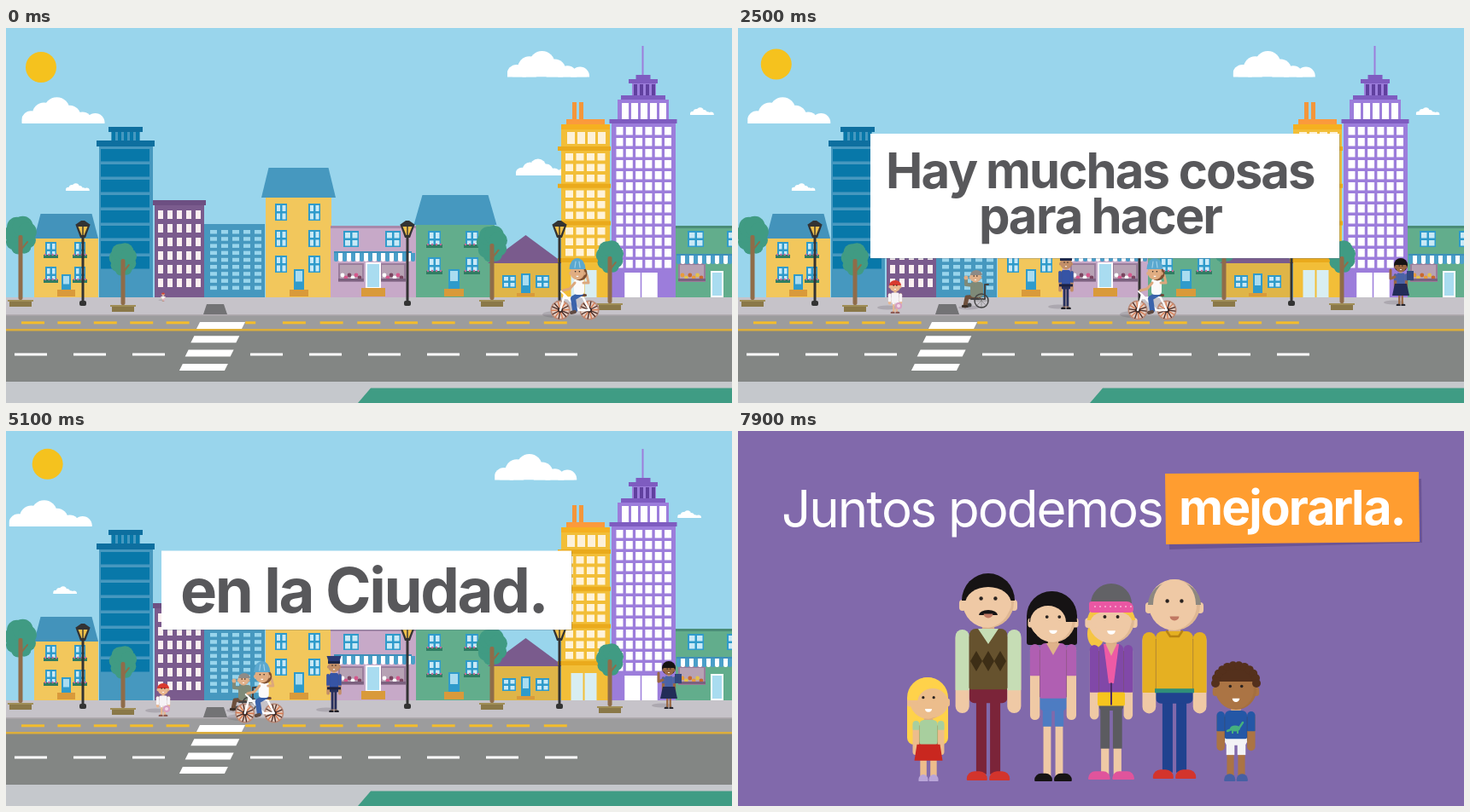
An HTML page with a canvas that plays this animation: 850 by 440 pixels, repeating every 8000 ms.

```html
<!DOCTYPE html>
<html lang="es">
<head>
<meta charset="utf-8">
<style>
html, body { margin: 0; overflow: hidden; }
canvas { display: block; }
</style>
</head>
<body>
<canvas id="stage" width="850" height="440"></canvas>
<script>
const g = document.getElementById('stage').getContext('2d');
const BLUE = '#4698bf', DEEP = '#0878a9', YELLOW = '#f2c75c', GREEN = '#62ad8c', LEAF = '#409b83',
  PLUM = '#7a5b8d', VIOLET = '#9c7ddb', LEDGE = '#7e5cc0', SKY = '#99d5ec', GLASS = '#a9dcf0',
  SKIN = '#efc9a5', INK = '#58585b', BACKDROP = '#8169ab', BLACK = '#161314';

// Drawing helpers
function rect(x, y, w, h, color, r = 0) {
  g.fillStyle = color;
  g.beginPath();
  g.roundRect(x, y, w, h, r);
  g.fill();
}
function disc(x, y, r, color, ry = r, from = 0, to = 2 * Math.PI) {
  g.fillStyle = color;
  g.beginPath();
  g.ellipse(x, y, r, ry, 0, from, to);
  g.fill();
}
const dome = (x, y, r, color, ry = r) => disc(x, y, r, color, ry, Math.PI);
function poly(color, ...p) {
  g.fillStyle = color;
  g.beginPath();
  for (let i = 0; i < p.length; i += 2) g.lineTo(p[i], p[i + 1]);
  g.fill();
}
// Upright trapezoid around a centre line
const trapezoid = (color, x, y, top, h, bottom) =>
  poly(color, x - top / 2, y, x + top / 2, y, x + bottom / 2, y + h, x - bottom / 2, y + h);
function line(color, width, ...p) {
  g.strokeStyle = color;
  g.lineWidth = width;
  g.lineCap = g.lineJoin = 'round';
  g.beginPath();
  for (let i = 0; i < p.length; i += 2) g.lineTo(p[i], p[i + 1]);
  g.stroke();
}
function pair(cx, d, y, w, h, color, r = 0) {
  rect(cx - d - w / 2, y, w, h, color, r);
  rect(cx + d - w / 2, y, w, h, color, r);
}
function grid(x, y, cols, rows, dx, dy, w, h, color) {
  for (let r = 0; r < rows; r++)
    for (let c = 0; c < cols; c++) rect(x + c * dx, y + r * dy, w, h, color);
}
function spokes(x, y, r, n, turn, width, colors) {
  for (let i = 0; i < n; i++) {
    const a = turn + i * Math.PI / n, c = r * Math.cos(a), s = r * Math.sin(a);
    line(colors[i % colors.length], width, x - c, y - s, x + c, y + s);
  }
}
function scaled(cx, cy, s, draw) {
  if (s <= 0) return;
  g.save();
  g.translate(cx, cy);
  g.scale(s, s);
  g.translate(-cx, -cy);
  draw();
  g.restore();
}

// Timing helpers
const clamp = v => Math.max(0, Math.min(1, v));
function pop(t, start, length = 400) {
  const p = clamp((t - start) / length) - 1;
  return 1 + 2.7 * p ** 3 + 1.7 * p ** 2;
}
function type(t, text, x, y, size, weight, color, start, step) {
  g.font = `${weight} ${size}px Inter, Arial, sans-serif`;
  g.letterSpacing = -size * 0.033 + 'px';
  g.fillStyle = color;
  [...text].forEach((ch, i) => {
    g.globalAlpha = clamp((t - start - i * step) / 100);
    g.fillText(ch, x + g.measureText(text.slice(0, i)).width, y);
  });
  g.globalAlpha = 1;
}

// City
function cloud(x, y, w) {
  g.save();
  g.translate(x, y);
  g.scale(w / 98, w / 98);
  g.beginPath();
  g.rect(0, -40, 98, 40);
  g.clip();
  for (let cx = 11; cx < 90; cx += 15) {
    const k = Math.exp(-(((cx - 39) / 20) ** 2));
    disc(cx, -15 * k - 1, 11 + 4 * k, '#fff');
  }
  rect(4, -5, 92, 5, '#fff', 3);
  g.restore();
}
function windowAt(x, y, w, h, flowers) {
  rect(x, y, w, h, '#2f9bcb');
  grid(x + 2, y + 2, 2, 2, w / 2 - 0.5, h / 2 - 0.5, w / 2 - 3, h / 2 - 3, '#c9e9f6');
  if (!flowers) return;
  rect(x - 2, y + h - 4, w + 4, 4, '#2f7d62');
  for (let i = 0; i < 4; i++) disc(x + i * w / 3, y + h - 4, 1.2, '#c06a9a');
}
function door(x, y, w, h, frame = '#2f9bcb') {
  rect(x, y, w, h, frame);
  rect(x + 2, y + 2, w - 4, frame == '#fff' ? h - 4 : h / 2, GLASS);
  rect(x - 5, y + h - 1, w + 10, 316 - y - h, '#d99a3a');
}
function house(x, w, top, wall, roof, roofTop, ridge, eaves) {
  rect(x, top, w, 316 - top, wall);
  trapezoid(roof, x + w / 2, roofTop, ridge, top - roofTop + 1, w + eaves);
}
function shop(x, w, wall, trim) {
  rect(x, 232, w, 84, wall);
  rect(x, 232, w, 3, trim);
}
function awning(x, y, w) {
  rect(x, y, w, 3, '#3d8fb9');
  for (let i = 0; i < w / 5; i++)
    rect(x + i * 5, y + 2, 5, 10, i % 2 ? '#fff' : '#4a9fc9', [0, 0, 2, 2]);
}
function display(x, w, colors) {
  rect(x, 276, w, 22, '#9a7d9c');
  rect(x + 2, 278, w - 4, 18, '#b7a2b4');
  for (let i = 0; i < 6; i++) disc(x + 5 + i * (w - 10) / 5, 290 + i % 2 * 3, 2.4, colors[i % 3]);
  rect(x, 294, w, 3, '#7c617f');
}
function tree(x, y, bottom, s) {
  disc(x, y, 12 * s, LEAF, 18 * s);
  for (let i = 0; i < 8; i++) {
    const a = i * Math.PI / 4 + 0.3;
    disc(x + 9 * s * Math.cos(a), y + 13 * s * Math.sin(a), (10 - 2 * Math.sin(a)) * s, LEAF);
  }
  rect(x - 2.5, y - 2, 5, bottom - y + 2, '#8f6c49', 2);
  line('#8f6c49', 2, x, y + 16 * s, x + 8 * s, y + 6 * s);
  rect(x - 13, bottom, 26, 8, '#8a7848');
  rect(x - 15, bottom, 30, 2, '#a08e57');
}
function lamp(x) {
  rect(x - 1.5, 244, 3, 80, '#333');
  rect(x - 4, 320, 8, 6, '#333', 2);
  trapezoid('#333', x, 226, 4, 5, 18);
  trapezoid('#333', x, 231, 17, 15, 6);
  trapezoid('#f0c04a', x, 233, 11, 10, 3);
  rect(x - 0.7, 231, 1.4, 14, '#333');
}
function leftSide() {
  house(33, 75, 246, YELLOW, '#4393bb', 218, 60, 0);
  for (const x of [46, 80]) for (const y of [251, 280]) windowAt(x, y, 13, 19, true);
  door(65, 289, 11, 19);

  rect(120, 116, 40, 6, '#0e6f9f');
  rect(123, 122, 34, 11, BLUE);
  grid(124, 122, 5, 1, 7, 0, 4, 11, DEEP);
  rect(109, 138, 63, 178, BLUE);
  rect(106, 132, 68, 7, '#0e6f9f');
  grid(111, 142, 1, 8, 0, 18, 57, 14.5, DEEP);

  rect(174, 207, 58, 109, PLUM);
  rect(172, 202, 62, 6, '#6d4f82');
  grid(178, 214, 5, 6, 11, 16, 6, 10, '#fbeff0');

  rect(232, 230, 71, 86, BLUE);
  grid(239, 237, 5, 9, 13, 8.2, 8, 4.5, SKY);

  house(304, 77, 198, YELLOW, BLUE, 164, 70, 10);
  for (const x of [315, 354]) for (const y of [206, 237, 267]) windowAt(x, y, 14, 20);
  door(337, 283, 12, 25);
}
function middle() {
  shop(380, 100, '#c7a9c8', '#a788aa');
  for (const x of [395, 444]) {
    windowAt(x, 238, 18, 19);
    display(x - 6, 30, ['#fff', '#d5588c', '#7a4560']);
  }
  awning(384, 262, 91);
  door(421, 275, 18, 31, '#fff');

  house(480, 92, 230, GREEN, BLUE, 196, 77, 5);
  for (const x of [494, 538]) for (const y of [238, 269]) windowAt(x, y, 15, 20, true);
  door(518, 283, 13, 24);

  house(568, 81, 275, '#dfb548', PLUM, 243, 0, 8);
  windowAt(581, 290, 16, 15);
  windowAt(620, 290, 16, 15);
  door(603, 288, 11, 24);
}
function rightSide() {
  pair(669.5, 4, 87, 5, 22, '#f4963a');
  rect(650, 117, 57, 199, '#f2be38');
  rect(656, 107, 45, 6, '#fb9a3c');
  rect(650, 113, 57, 6, '#f5b020');
  grid(657, 122, 4, 1, 12, 0, 9, 14, '#fdf1d8');
  for (let i = 0; i < 4; i++) {
    if (i < 3) grid(655, 147 + i * 43.5, 4, 3, 12.5, 12.5, 9, 8.5, '#fff3d9');
    rect(646, 139 + i * 43.7, 62, 5, '#eaaa1c');
  }
  pair(676.5, 8, 284, 14, 32, '#d8eef2');

  rect(744.5, 21, 2, 36, VIOLET);
  rect(733, 65, 28, 15, VIOLET);
  grid(735, 66, 4, 1, 7, 0, 4, 13, '#60409f');
  rect(716, 84, 60, 24, VIOLET);
  grid(721, 88, 5, 1, 11, 0, 8, 19, '#fff');
  rect(709, 110, 75, 206, VIOLET);
  for (const [y, w] of [[55, 17], [60, 34], [79, 52], [107, 79]]) rect(746 - w / 2, y, w, 5, LEDGE);
  grid(714.5, 116, 6, 13, 11.3, 13, 8, 9.5, '#fff');
  pair(743.5, 10, 287, 18.5, 29, '#fff');

  shop(784, 66, GREEN, '#4a8c76');
  windowAt(798, 238, 19, 19);
  windowAt(844, 238, 19, 19);
  display(787, 32, ['#e89b3a', '#e4c14a', '#c9692e']);
  awning(785, 265, 66);
  door(825, 285, 15, 31, '#fff');
}
function street() {
  rect(0, 316, 850, 22, '#c6c3c9');
  rect(0, 336, 850, 18, '#9c9c9d');
  rect(0, 336, 850, 1.5, '#b1abb0');
  rect(0, 355, 850, 61, '#838684');
  rect(0, 353, 850, 2.5, '#dcae3c');
  rect(0, 415, 850, 25, '#c5c8cc');
  poly('#3f9c84', 427, 422.5, 850, 422.5, 850, 440, 412, 440);
  for (let i = 0; i < 15; i++)
    if (i != 5) rect(18 + i * 43.7 - (i < 5 ? i * 1.3 : 0), 344.3, i == 6 ? 12 : 27, 3, '#f3bc2c');
  for (let i = 0; i < 10; i++)
    if (i != 3) rect(10 + i * 69, 381.5, 38, 3, '#fff');
  for (let i = 0; i < 4; i++) {
    const x = 227 - i * 6.7, y = 345 + i * 16.3;
    poly('#fff', x, y, x + 53, y, x + 49, y + 8, x - 4, y + 8);
  }
  trapezoid('#737375', 245, 324, 20, 12, 28);
  tree(17, 245, 319, 1);
  tree(137, 273, 325, 0.85);
  tree(569, 255, 319, 0.95);
  tree(707, 270, 323, 0.85);
  [90, 470, 648].forEach(lamp);
}

// People: every measure follows from the head radius and the height
function face(x, y, r, skin, hair, smile = '#fff') {
  pair(x, r, y - r * 0.1, r * 0.27, r * 0.43, skin, r * 0.13);
  disc(x, y, r, skin);
  g.save();
  g.beginPath();
  g.arc(x, y, r, 0, 7);
  g.arc(x - r * 0.13, y, r, 0, 7);
  g.clip('evenodd');
  disc(x + r * 0.1, y, r, 'rgba(130,80,40,.14)');
  g.restore();
  if (hair) hair();
  for (const side of [-1, 1]) disc(x + side * r * 0.28, y - r * 0.15, Math.max(0.8, r * 0.073), '#2a2320');
  disc(x, y + r * 0.45, r * 0.18, smile, r * 0.17, 0, Math.PI);
}
function figure(x, head, r, feet, o) {
  const { skin = SKIN, build = 1.25, top, sleeve = top, cuff = 0.4, pants, length = 0.95,
    shoe, foot = 0.8, details, hair, smile } = o;
  const neck = head + r + 1, h = feet - neck, hem = neck + 0.4 * h, leg = feet - hem,
    half = build * r, arm = half * 0.42, hips = half * 0.58;
  pair(x, r * 0.27, hem, r * 0.34, leg - r * 0.2, skin);
  pair(x, r * 0.27, hem - 2, r * 0.4, leg * length, pants);
  rect(x - hips, hem - 3, hips * 2, leg * 0.15 + 3, pants, [0, 0, r * 0.2, r * 0.2]);
  pair(x, foot * r * 0.55, feet - r * 0.36, foot * r, r * 0.36, shoe, [r * 0.3, r * 0.3, 1, 1]);
  pair(x, half - arm / 2, neck + r * 0.1, arm, h * 0.54, skin, arm / 2);
  pair(x, half - arm / 2, neck + 1, arm, h * cuff, sleeve, [arm * 0.7, arm * 0.7, 1, 1]);
  rect(x - r * 0.24, neck - r * 0.3, r * 0.48, r * 0.5, '#d9ac84');
  rect(x - half + arm, neck, 2 * (half - arm), 0.4 * h, top, [r * 0.25, r * 0.25, 2, 2]);
  pair(x, half - arm, neck + r * 0.3, r * 0.03, h * 0.34, 'rgba(60,30,0,.25)');
  if (details) details(neck, hem);
  face(x, head, r, skin, hair, smile);
}

// Passers-by
const shadow = (x, y) => disc(x, y, 12, 'rgba(80,75,85,.22)', 2.5);
function child() {
  shadow(175, 328);
  figure(184, 303, 6.5, 335, {
    skin: '#e9b68f', top: '#f6f3f6', pants: '#f6f3f6', length: 0.4, shoe: '#8d5a54',
    hair: () => dome(184, 302, 7, '#d8392f', 6)
  });
  disc(188, 326, 4, '#d79fc2');
  disc(188, 326, 2, '#f3d8e8');
}
function wheelchair() {
  shadow(270, 328);
  line('#6d4f3c', 5, 282, 315, 268, 316, 266, 326);
  rect(262, 325, 8, 3, '#3c3028', 1);
  rect(272, 298, 15, 18, '#7f8a78', 4);
  line('#7f8a78', 4, 275, 302, 267, 301, 267, 295);
  disc(267, 293, 2.5, '#dfae86');
  face(278, 292, 6.5, '#e0b08a', () => dome(279, 290, 7, '#8e8a86', 6));
  line('#444', 2, 293, 301, 289, 301, 289, 318, 273, 318);
  spokes(285, 320, 8, 4, 0, 0.6, ['#777']);
  g.strokeStyle = '#444';
  g.lineWidth = 1.5;
  g.beginPath();
  g.arc(285, 320, 8, 0, 7);
  g.stroke();
  disc(271, 325, 2.5, '#444');
}
function teacher() {
  shadow(768, 322);
  disc(776, 278, 8, BLACK);
  figure(776, 280, 6.5, 326, {
    skin: '#9a6742', top: '#4a63a6', cuff: 0.2, pants: '#222c58', length: 0.3, shoe: '#26262e',
    details: (neck, hem) => trapezoid('#222c58', 776, hem - 3, 14, 14, 20),
    hair: () => dome(776, 278, 7.5, BLACK, 6)
  });
  line('#9a6742', 3, 769, 292, 764, 294, 764, 284);
  rect(783, 285, 8, 11, '#31477d');
}
function officer() {
  shadow(375, 327);
  figure(384, 276, 7, 330, {
    skin: '#c28e68', top: '#3654a5', cuff: 0.3, pants: '#262f5c', shoe: '#1d1d25',
    details: (neck, hem) => rect(376, hem - 2, 16, 3, '#1c2140'),
    hair: () => rect(377, 269, 14, 4, '#1c2548')
  });
  trapezoid('#2b3a75', 384, 264, 17, 6, 13);
}
function cyclist(x) {
  g.save();
  g.translate(x, 0);
  disc(-22, 336, 16, 'rgba(80,75,85,.2)', 4);
  for (const wx of [-17, 17]) {
    disc(wx, 331, 11.5, '#b98a78');
    disc(wx, 331, 10, '#e0c9bd');
    spokes(wx, 331, 10, 7, x / 11, 1.3, ['#4b2b25', '#d9784c']);
    disc(wx, 331, 3, '#3b2622');
  }
  line('#fff', 2.5, -17, 331, -12, 313, 5, 331, 17, 331, 9, 315, -11, 317);
  line('#fff', 2, -12, 313, -16, 309);
  rect(4, 312, 10, 3, '#704a38', 1.5);
  line('#3a63ab', 6, 7, 312, -2, 317, 0, 331);
  line('#5f4a42', 4, 0, 333, -4, 334);
  rect(-1, 294, 12, 19, '#fbfafa', 4);
  line('#dca77c', 3, 0, 299, -6, 306, -14, 308);
  line('#dca77c', 3, 10, 299, 16, 299, 14, 290);
  disc(6, 288, 8.5, '#7c4e30');
  face(3, 287, 8.5, '#e0ad82', () => dome(3, 283, 9.5, '#5ba8cf', 13));
  line('#9fd0e8', 1.2, 0, 281, 1, 274);
  line('#9fd0e8', 1.2, 6, 281, 5, 274);
  g.restore();
}

// White caption card
function card(s, x, y, w, h) {
  scaled(x + w / 2, y + h / 2, s, () => {
    const d = 16 * Math.abs(1 - s) + 1;
    rect(x + d, y + d, w, h, 'rgba(90,110,130,.3)');
    rect(x, y, w, h, '#fff');
  });
}
function city(t) {
  rect(0, 0, 850, 440, SKY);
  disc(41 + t * 0.0015, 46 - t * 0.0014, 18, '#f5c21e');
  const drift = t * 0.0029;
  cloud(18.5 - drift, 112, 98);
  cloud(587 - drift, 57.5, 97);
  cloud(70 - drift, 191, 28);
  cloud(801 - drift, 102, 28);
  cloud(597, 173, 62);
  leftSide();
  middle();
  rightSide();
  street();
  scaled(184, 316, pop(t, -25), child);
  scaled(277, 308, pop(t, 560), wheelchair);
  scaled(776, 298, pop(t, 560), teacher);
  scaled(384, 297, pop(t, 1050), officer);
  cyclist(666 - t * 0.0724);

  if (t < 3400) {
    card(pop(t, 120) * (1 - clamp((t - 3150) / 250)), 155, 124, 549, 146);
    if (t < 3150) {
      type(t, 'Hay muchas cosas', 173, 188, 58, 700, INK, 610, 65);
      type(t, 'para hacer', 282, 241, 58, 700, INK, 610 + 16 * 65, 65);
    }
  } else {
    card(pop(t, 3536), 182, 140.5, 480, 92.5);
    type(t, 'en la Ciudad.', 204, 213, 72.5, 700, INK, 3900, 65);
  }
}

// Family, left to right
const family = [
  () => {
    const blonde = '#ffd24a', skin = '#ecbd8c';
    rect(198, 289, 48, 79, blonde, [24, 24, 8, 8]);
    figure(223, 316, 22, 411, {
      skin, build: 0.84, top: '#a8cf9e', cuff: 0.15, pants: '#c9271f', length: 0.2, shoe: '#b9a5d8', foot: 0.5,
      details: (neck, hem) => trapezoid('#c9271f', 223, hem, 27, 19, 33),
      hair: () => {
        dome(222, 316, 23, blonde, 27);
        disc(228, 319, 18, skin, 17);
      }
    });
  },
  () => {
    figure(293, 201, 30, 410, {
      build: 1.28, top: '#66522e', sleeve: '#c6ddb5', pants: '#7b2439', shoe: '#d3342c', smile: '#c07862',
      details: neck => {
        trapezoid('#c6ddb5', 293, neck, 24, 18, 0);
        for (const x of [279, 293, 307]) {
          trapezoid('#3d2e16', x, 258, 0, 12, 14);
          trapezoid('#3d2e16', x, 270, 14, 12, 0);
        }
      },
      hair: () => {
        dome(293, 199, 31, BLACK, 32);
        disc(293, 203, 27, SKIN, 20);
        dome(293, 216, 11, BLACK, 6);
      }
    });
  },
  () => {
    rect(338, 188, 59, 63, BLACK, [29, 29, 3, 3]);
    figure(369, 222, 26, 411, {
      build: 1.04, top: '#b05fb2', cuff: 0.23, pants: '#4d7cc2', length: 0.36, shoe: BLACK,
      details: neck => trapezoid('#dfb28a', 369, neck, 16, 14, 0),
      hair: () => {
        dome(369, 224, 28, BLACK, 35);
        disc(363, 224, 21, SKIN, 19);
      }
    });
  },
  () => {
    const blonde = '#f5c543';
    disc(419, 238, 10, blonde, 16);
    figure(437, 222, 27, 409, {
      build: 0.93, top: '#8148a8', cuff: 0.35, pants: '#5b5b60', length: 0.64, shoe: '#e0549c', foot: 0.95,
      details: (neck, hem) => {
        trapezoid('#ee5aa5', 437, neck, 18, 46, 6);
        trapezoid('#dfb28a', 437, neck, 13, 14, 0);
        rect(421, hem - 7, 32, 16, '#f7c51e', 2);
        rect(436, hem - 18, 2, 26, '#4b2b68');
      },
      hair: () => {
        dome(437, 222, 28, blonde, 20);
        disc(437, 223, 24, SKIN, 12);
      }
    });
    dome(437, 203, 24, '#626266');
    rect(411, 200, 52, 13, '#ea57a3', [3, 8, 4, 4]);
    grid(417, 205, 8, 1, 6, 0, 2, 2, '#f59cc9');
  },
  () => figure(511, 204, 30, 408, {
    top: '#e5b022', cuff: 0.41, pants: '#20428f', shoe: '#d3342c', smile: '#c07862',
    details: (neck, hem) => {
      rect(488, hem - 2, 46, 5, '#2f8f79');
      line('#b98312', 2.5, 502, neck, 506, neck + 6, 516, neck + 6, 520, neck);
    },
    hair: () => {
      dome(511, 204, 31, '#8d8880', 28);
      disc(511, 203, 25, SKIN, 29);
    }
  }),
  () => figure(583, 303, 24, 411, {
    skin: '#ab7444', build: 0.94, top: '#2457a6', cuff: 0.28, pants: '#f3f3f6', length: 0.42, shoe: '#4660a4', foot: 0.55,
    details: () => {
      disc(582, 349, 6, '#45b07e', 3.5);
      line('#45b07e', 2.5, 573, 352, 580, 349, 587, 348, 591, 342);
      pair(582, 3, 350, 2, 5, '#45b07e');
    },
    hair: () => {
      dome(583, 294, 24, '#54301c', 20);
      for (let i = 0; i < 12; i++) {
        const a = Math.PI * (1 + i / 11);
        disc(583 + 24 * Math.cos(a), 296 + 21 * Math.sin(a), 5, '#54301c');
      }
    }
  })
];
function together(t) {
  rect(0, 0, 850, 440, BACKDROP);
  family.forEach((draw, i) => scaled(222 + i * 72, 290, pop(t, 6350 + i * 140), draw));
  type(t, 'Juntos podemos', 51, 113, 60, 400, '#fff', 6200, 52);
  scaled(649, 91, pop(t, 6700, 350), () => {
    poly('#6b5495', 504, 60, 800, 56, 801, 131, 505, 139);
    poly('#ff9d30', 500, 50, 797, 48, 798, 130, 501, 133);
  });
  type(t, 'mejorarla.', 516, 110, 57, 700, '#fff', 6200 + 15 * 52, 52);
}

function frame() {
  const t = Math.floor(performance.now() % 8000 / 100) * 100;
  if (t < 5850) {
    city(t);
    g.globalAlpha = clamp((t - 5450) / 400);
    rect(0, 0, 850, 440, BACKDROP);
    g.globalAlpha = 1;
  } else together(t);
  requestAnimationFrame(frame);
}
frame();
</script>
</body>
</html>
```
